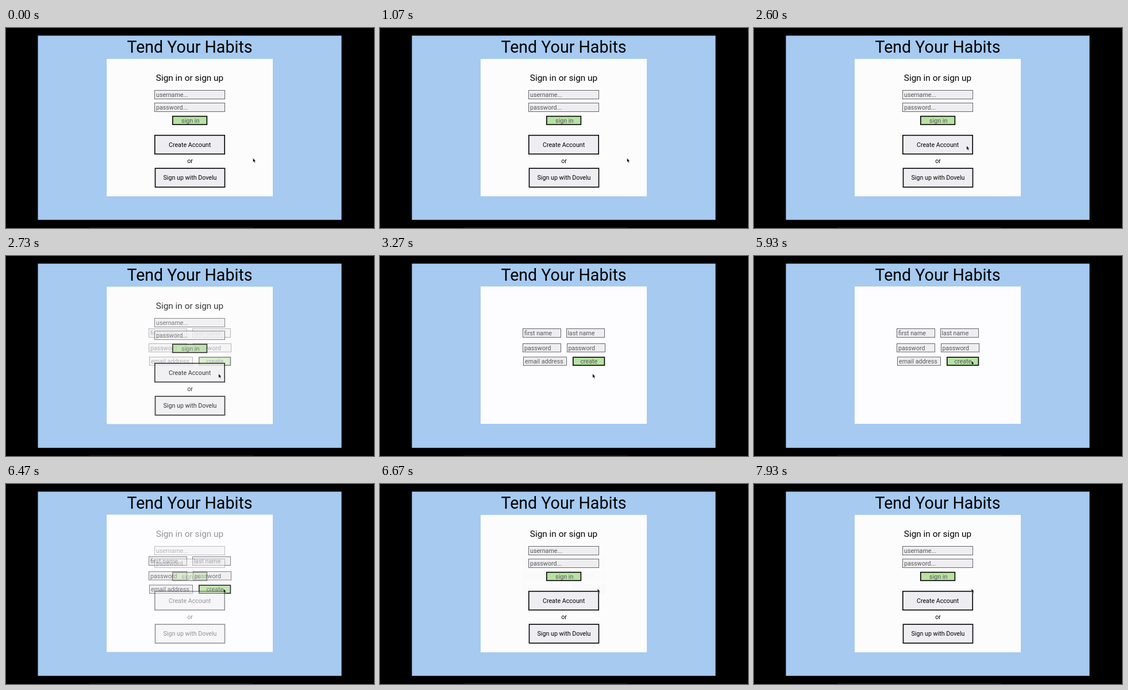
Animation, 640 px wide and 348 px high, one loop 8 s. Source, as an HTML page:

```html
<!DOCTYPE html>
<html lang="en">
<head>
<meta charset="utf-8">
<title>Sign up prototype</title>
<style>
html, body { margin: 0; width: 100%; height: 100%; overflow: hidden; background: #000; }
svg { display: block; width: 640px; height: 348px; }
text { font: 10.7px Roboto, Arial, sans-serif; }
.mid { text-anchor: middle; }
.field rect { fill: #eeedf0; stroke: #66656a; }
.field text, .go text { fill: #58585a; }
.button rect { fill: #eeedf1; stroke: #000; stroke-width: 1.6; }
.go rect { fill: #b7e2a1; stroke: #000; stroke-width: 1.6; }
</style>
</head>
<body>
<svg viewBox="0 0 640 348">
  <rect x="145" y="347" width="285" height="1" fill="#1b1b1b"/>
  <rect x="55.5" y="13.3" width="528" height="320.5" fill="#a6caf0"/>
  <text class="mid" x="319.5" y="43" style="font-size:28.6px">Tend Your Habits</text>
  <rect id="card" x="175" width="289" height="239"/>
  <g id="form"></g>
  <g id="login">
    <text class="mid" x="319.5" y="92" style="font-size:15.4px">Sign in or sign up</text>
    <text class="mid" x="320" y="235.3">or</text>
  </g>
  <path id="cursor" d="M0 0V6.7L1.5 5.4L2.7 8L3.9 7.4L2.8 5H4.7Z" fill="#000" stroke="#fff" stroke-width=".4"/>
</svg>
<script>
const LOOP = 8000;
const [card, form, login, cursor] =
  ['card', 'form', 'login', 'cursor'].map(id => document.getElementById(id));

function box(parent, type, x, y, w, h, label, labelX) {
  const left = type === 'field';
  parent.insertAdjacentHTML('beforeend', `<g class="${type}">
    <rect x="${x}" y="${y}" width="${w}" height="${h}"/>
    <text class="${left ? '' : 'mid'}" x="${labelX}" y="${y + h / 2 + 3.8}">${label}</text></g>`);
}

box(login, 'field', 258.5, 108.5, 122, 15, 'username...', 261);
box(login, 'field', 258.5, 130.5, 122, 15, 'password...', 261);
box(login, 'go', 289.8, 153.6, 59.6, 14.4, 'sign in', 320.7);
box(login, 'button', 258.8, 186.7, 121.4, 32.6, 'Create Account', 319.6);
box(login, 'button', 259.5, 244.2, 121, 32.6, 'Sign up with Dovelu', 320);

box(form, 'field', 248.5, 126.5, 66, 15, 'first name', 251);
box(form, 'field', 324.5, 126.5, 66, 15, 'last name', 326.5);
box(form, 'field', 248.5, 152.5, 66, 14.5, 'password', 251);
box(form, 'field', 325.5, 152.5, 66, 14.5, 'password', 327.5);
box(form, 'field', 249.5, 175.8, 75, 14.5, 'email address', 252);
box(form, 'go', 335.8, 176.2, 54.6, 14, 'create', 363.3);

// Pointer keys: time, x, y
const path = [
  [0, 429.6, 226.6], [1300, 429.6, 226.6], [1750, 400, 215], [2200, 369.8, 205],
  [4950, 369.8, 205], [5070, 374, 203], [5330, 380, 190], [5600, 381, 186],
  [5900, 378.3, 182.3], [LOOP, 378.3, 182.3]
];

const clamp = v => Math.min(1, Math.max(0, v));
const easeOut = (t, start) => 1 - (1 - clamp((t - start) / 300)) ** 2;

function pointer(t) {
  const i = path.findIndex(k => k[0] > t);
  const [a, b] = [path[i - 1], path[i]];
  const p = (t - a[0]) / (b[0] - a[0]);
  return [a[1] + (b[1] - a[1]) * p, a[2] + (b[2] - a[2]) * p];
}

function draw(now) {
  const t = now % LOOP;
  const opened = easeOut(t, 2650), closed = easeOut(t, 6400);
  const back = t >= 6400;
  // The incoming screen fades in while the outgoing one lingers
  form.style.opacity = back ? 1 - closed ** 2 : opened;
  login.style.opacity = back ? closed : 1 - opened ** 2;
  const shown = back ? 1 - closed : opened;
  card.setAttribute('y', 53.8 - 0.8 * shown);
  card.setAttribute('fill', shown > 0.5 ? '#fdfcfe' : '#fcfcfc');
  cursor.setAttribute('transform', `translate(${pointer(t)})`);
  requestAnimationFrame(draw);
}
requestAnimationFrame(draw);
</script>
</body>
</html>
```
